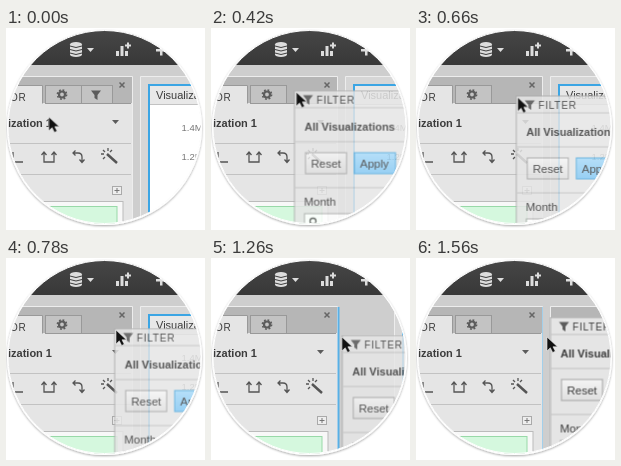
Write an HTML page that moves like this. It is 199 by 202 pixels and loops after 2460 ms.

```html
<!DOCTYPE html>
<html lang="en">
<head>
<meta charset="utf-8">
<title>Docking the filter panel</title>
<style>
  html, body { margin: 0; width: 100%; height: 100%; overflow: hidden; background: #fff; }
  svg { display: block; width: 199px; height: 202px; font: 11.5px "Liberation Sans", Arial, sans-serif; }
  text { fill: #3c3c3c; }
  .bold { font-weight: bold; font-size: 11px; }
  .caps { font-size: 10px; letter-spacing: .8px; }
  .axis { font-size: 9.5px; fill: #777; }
  .line { fill: none; stroke: #555; stroke-width: 1.3; }
  .rule { stroke: #c2c2c2; }
  .edge { fill: none; stroke: #ededed; }

  #cursor, #filter, #tab, #view, #gap, #dock { animation: 2460ms linear infinite; }
  #cursor { animation-name: point; }
  #filter { animation-name: drag; }
  #dock { animation-name: settle; }
  #tab { animation-name: tab; animation-timing-function: step-end; }
  #view { animation-name: view; animation-timing-function: step-end; }
  #gap { animation-name: gap; animation-timing-function: step-end; }

  @keyframes point {
    0% { transform: translate(42.5px, 89px); }
    7.317%, 12.195% { transform: translate(77px, 61.5px); }
    34.146% { transform: translate(114px, 73.3px); animation-timing-function: cubic-bezier(.333, 1, .667, 1); }
    56.098%, 100% { transform: translate(131px, 79px); }
  }
  @keyframes drag {
    0%, 12.194% { transform: translate(74.5px, 59.5px); opacity: 0; }
    12.195% { transform: translate(74.5px, 59.5px); opacity: .85; }
    34.146% { transform: translate(112.3px, 71.3px); opacity: .85; animation-timing-function: cubic-bezier(.333, 1, .667, 1); }
    56.098% { transform: translate(131px, 77px); opacity: .85; }
    63.415%, 100% { transform: translate(134px, 59px); opacity: 1; }
  }
  @keyframes settle {
    0%, 56.098% { opacity: 0; }
    63.415%, 100% { opacity: 1; }
  }
  @keyframes tab { 0% { opacity: 1; } 12.25%, 100% { opacity: 0; } }
  @keyframes view {
    0% { transform: none; }
    44.7%, 100% { transform: translateX(49px); }
  }
  @keyframes gap { 0% { opacity: 0; } 44.7%, 100% { opacity: 1; } }
</style>
</head>
<body>
<svg viewBox="0 0 199 202">
  <defs>
    <clipPath id="lens"><circle cx="98.500" cy="99" r="96.500"/></clipPath>
    <linearGradient id="bar" x2="0" y2="1"><stop stop-color="#474747"/><stop offset="1" stop-color="#383838"/></linearGradient>
    <linearGradient id="blue" x2="0" y2="1"><stop stop-color="#a9daf8"/><stop offset="1" stop-color="#86c8f2"/></linearGradient>
    <linearGradient id="button" x2="0" y2="1"><stop stop-color="#f4f4f4"/><stop offset="1" stop-color="#dfdfdf"/></linearGradient>
    <path id="funnel" d="M-5-4.500H5L1.500 0V5L-1.500 3V0Z" fill="#5c5c5c"/>
    <path id="caret" d="M-3.500-2H3.500L0 2Z"/>
    <filter id="shadow" x="-10%" y="-10%" width="120%" height="120%">
      <feDropShadow dx="0" dy="1" stdDeviation="1" flood-opacity=".35"/>
    </filter>
  </defs>

  <circle cx="98.500" cy="99.500" r="97.500" fill="#fff" filter="url(#shadow)"/>
  <g clip-path="url(#lens)">
    <rect width="199" height="202" fill="#cecece"/>
    <rect width="199" height="37" fill="url(#bar)"/>
    <g fill="#ddd">
      <path d="M64 16.500a6 2.500 0 0 1 12 0v10a6 2.500 0 0 1-12 0Z"/>
      <path d="M64 18q6 3 12 0M64 21.500q6 3 12 0M64 25q6 3 12 0" fill="none" stroke="#3e3e3e"/>
      <use href="#caret" x="84.500" y="22"/>
      <path d="M110 23h3v5h-3zM114.500 18h3v10h-3zM119 23h3v5h-3zM121 14.500h2v2h2v2h-2v2h-2v-2h-2v-2h2z"/>
      <path d="M154 17h2.500v4h4v2.500h-4v4H154v-4h-4V21h4z"/>
    </g>

    <!-- editor panel -->
    <rect x="-2" y="49" width="128" height="160" fill="#b6b6b6"/>
    <path class="edge" d="M0 48.500H126.500V202"/>
    <path d="M113.500 54.500l5 5m0-5l-5 5" stroke="#666" stroke-width="1.500"/>
    <rect y="75" width="126" height="130" fill="#e5e5e5"/>
    <path d="M0 57.500H36.500V76H0Z" fill="#e5e5e5"/>
    <path d="M0 57.500H36.500V75.500M75.500 75.500H125" fill="none" stroke="#999"/>
    <rect x="39.500" y="57.500" width="36" height="18" fill="#c3c3c3" stroke="#999"/>
    <g id="tab">
      <rect x="75.500" y="57.500" width="31" height="18" fill="#c3c3c3" stroke="#999"/>
      <use href="#funnel" x="90" y="67"/>
    </g>
    <g fill="none" stroke="#5c5c5c">
      <circle cx="56" cy="66.500" r="3" stroke-width="2.200"/>
      <circle cx="56" cy="66.500" r="4.600" stroke-width="1.600" stroke-dasharray="1.810 1.800"/>
    </g>
    <text class="caps" x="20.500" y="73" text-anchor="end">EDITOR</text>
    <text class="bold" x="46" y="98.500" text-anchor="end">Visualization 1</text>
    <use href="#caret" x="109.500" y="94" fill="#5c5c5c"/>
    <path class="rule" d="M0 115.500H125M0 146.500H125"/>
    <path class="line" d="M7 124v10h10" stroke="#999"/>
    <path class="line" d="M38 126v8h10v-8M35.500 127l2.500-3 2.500 3M45.500 127l2.500-3 2.500 3"/>
    <path class="line" d="M67 125h5q4 0 4 4v5M69.500 122.500L67 125l2.500 2.500M73.500 131.500l2.500 3 2.500-3"/>
    <path d="M101 126l10 9" stroke="#555" stroke-width="2.500"/>
    <path class="line" d="M97 122l2 2m3-4v3m4-1l-2 2m-9 2h3m-1 5l2-2"/>
    <rect x="106.500" y="158.500" width="9" height="8" fill="#eee" stroke="#aaa"/>
    <path d="M108.500 162.500h5m-2.500-2.500v5" stroke="#777"/>
    <rect x="-5" y="173.500" width="122" height="40" fill="#f8f8f8" stroke="#bbb"/>
    <rect x="-5" y="178.500" width="116" height="17" fill="#d5f8de" stroke="#98d9a8"/>

    <!-- chart panel -->
    <g id="view">
      <rect x="135" y="49" width="90" height="160" fill="#d6d6d6"/>
      <path class="edge" d="M134.500 202V48.500H225"/>
      <rect x="143" y="57" width="90" height="160" fill="#fff" stroke="#3ba5e4" stroke-width="2"/>
      <rect x="144" y="58" width="80" height="18" fill="#e8e8e8"/>
      <path class="rule" d="M144 76.500H220"/>
      <text x="150" y="71" style="font-size:11px">Visualization 1</text>
      <text class="axis" x="175.500" y="103">1.4M</text>
      <text class="axis" x="175.500" y="132">1.2M</text>
    </g>
    <path id="gap" d="M127.500 49V202" stroke="#58b0e6" stroke-width="2"/>
    <g id="dock">
      <rect x="127" y="48" width="80" height="160" fill="#cecece"/>
      <rect x="135" y="49" width="90" height="160" fill="#b6b6b6"/>
      <path class="edge" d="M134.500 202V48.500H225"/>
    </g>

    <g id="filter">
      <rect x=".5" y=".5" width="140" height="160" fill="#e5e5e5" stroke="#aaa"/>
      <path class="rule" d="M1 17.500H140M1 51.500H140M1 97.500H140"/>
      <use href="#funnel" x="14" y="9.500"/>
      <text class="caps" x="22.500" y="13">FILTER</text>
      <text class="bold" x="10.500" y="40">All Visualizations</text>
      <rect x="11.500" y="62.500" width="41" height="21" fill="url(#button)" stroke="#a5a5a5"/>
      <text x="17" y="77.500">Reset</text>
      <rect x="60.500" y="62.500" width="41" height="21" fill="url(#blue)" stroke="#54a9dc"/>
      <text x="66" y="77.500">Apply</text>
      <text x="10" y="115.500">Month</text>
      <rect x="10.500" y="123.500" width="120" height="18" fill="#fff" stroke="#aaa"/>
      <circle class="line" cx="19" cy="131" r="3"/>
      <path class="line" d="M21 133l3 3"/>
    </g>

    <path id="cursor" d="M0 0V14L3.300 10.800L5.700 15.500L8.300 14.200L6 9.800H10.500Z" fill="#111" stroke="#eee" stroke-width=".6"/>
  </g>
  <circle cx="98.500" cy="99" r="96.500" fill="none" stroke="#fff"/>
</svg>
</body>
</html>
```
